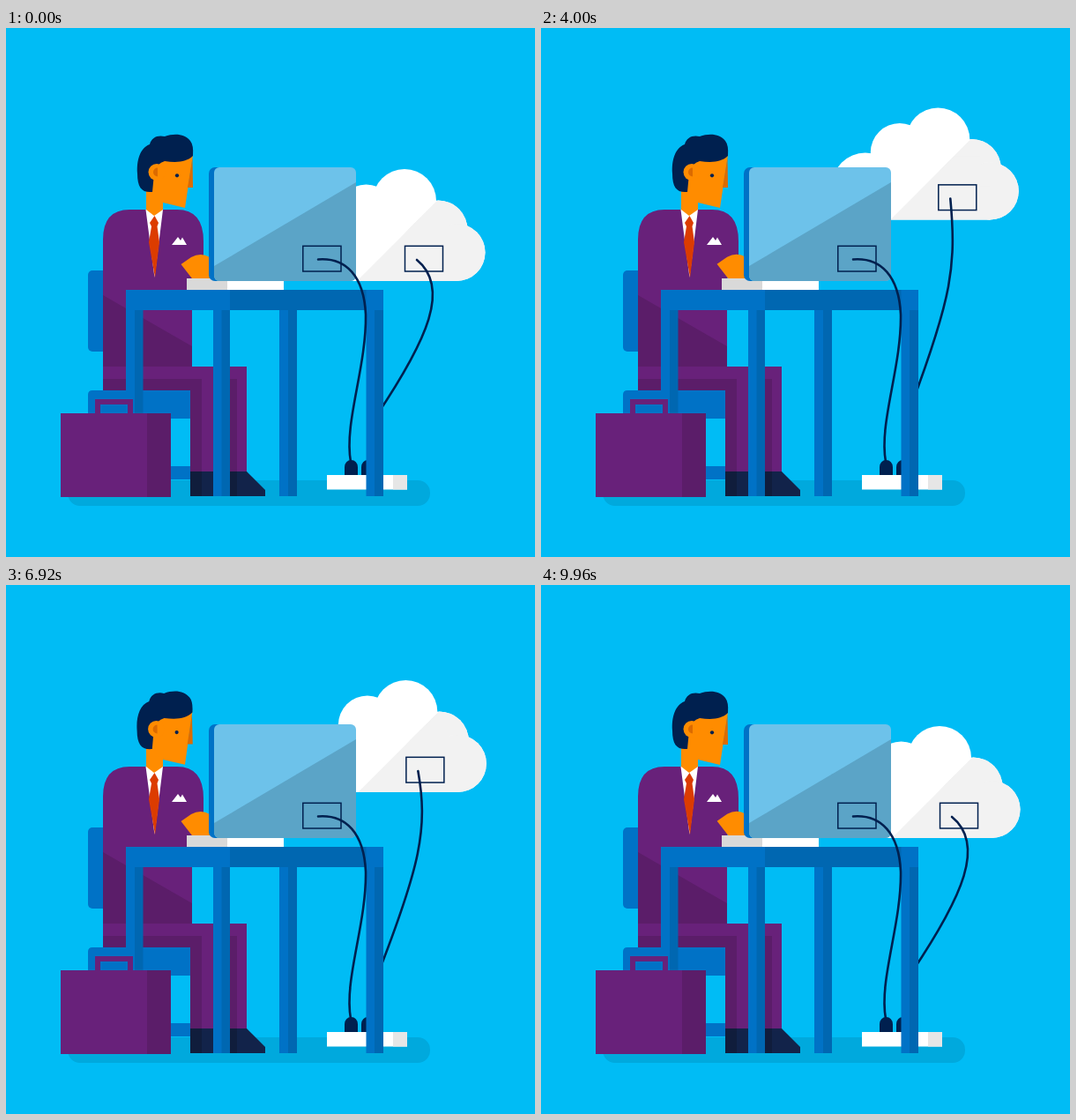
An HTML page for the animation above (10 s loop, 600x600 px).

```html
<!DOCTYPE html>
<html lang="en">
<head>
<meta charset="utf-8">
<title>Cloud desk</title>
<style>
html, body { margin: 0; width: 100%; height: 100%; overflow: hidden; background: #00bcf5; }
svg { display: block; width: 100vw; height: 100vh; }
.sky { fill: #00bcf5; }
.blue { fill: #0072c6; }
.deep { fill: #0067b1; }
.suit { fill: #68217a; }
.shade { fill: #5b1d69; }
.skin { fill: #ff8c00; }
.tan { fill: #dc6b00; }
.navy { fill: #00204f; }
.white { fill: #fff; }
.line { fill: none; stroke: #00204f; stroke-width: 1.5; }
.cable { fill: none; stroke: #00204f; stroke-width: 2.6; stroke-linecap: round; }
</style>
</head>
<body>
<svg viewBox="0 0 600 600">
  <defs>
    <clipPath id="screen"><rect x="236" y="158" width="161" height="129" rx="6"/></clipPath>
    <clipPath id="right"><path d="M585 100V300H385Z"/></clipPath>
    <g id="puffs">
      <circle cx="369.5" cy="249" r="38"/>
      <circle cx="408.5" cy="210.5" r="33"/>
      <circle cx="452" cy="196" r="36"/>
      <circle cx="490" cy="229" r="33.5"/>
      <circle cx="511" cy="254.5" r="32.5"/>
      <path d="M369 249H400V215H500V249H511V287H369Z"/>
    </g>
  </defs>

  <rect class="sky" width="600" height="600"/>
  <rect x="70" y="513" width="411" height="29" rx="14" fill="#00a9dd"/>

  <g id="cloud">
    <use href="#puffs" class="white"/>
    <g clip-path="url(#right)"><use href="#puffs" fill="#f2f2f2"/></g>
    <rect class="line" x="452.5" y="247.3" width="43" height="28.7"/>
  </g>
  <path id="cable" class="cable"/>

  <g class="navy">
    <path d="M384 508V498a7.5 8 0 0 1 15 0V508Z"/>
    <path d="M403 508V498a7.5 8 0 0 1 15 0V508Z"/>
  </g>
  <rect class="white" x="364" y="507" width="91" height="16.5"/>
  <rect x="439" y="507" width="16" height="16.5" fill="#e6e6e6"/>

  <g class="blue">
    <rect x="93" y="275" width="30" height="92" rx="5"/>
    <path d="M93 443V416q0-5 5-5H210V443Z"/>
    <rect x="180" y="497" width="30" height="15"/>
  </g>

  <path class="suit" d="M110 411V240Q110 206 140 206H194Q224 206 224 242V258L211 284V384H273V504H209V411Z"/>
  <path class="shade" d="M110 303L211 361V384H110ZM110 398H222V504H209V411H110ZM254 398H262V504H254Z"/>
  <path d="M209 503H235V531H209ZM254 503H273L294 524V531H254Z" fill="#12234a"/>
  <path d="M209 503H222V531H209ZM254 503H262V531H254Z" fill="#101d3c"/>
  <path class="white" d="M158.500 206H178L168.500 283ZM188 246L195 237 198 241 200 237.500 205 246Z"/>
  <path d="M168.500 213L173 221 171.500 225 174 243 169 283 162 243 165 225 163 221Z" fill="#dc3c00"/>
  <path class="skin" d="M159 180H178V206L168 213 159 206Z"/>

  <g id="head">
    <path class="skin" d="M165 152L212 144 203 204 178 198 164 187Z"/>
    <path class="tan" d="M211.500 147L206 181H212Z"/>
    <path class="navy" d="M166 186C154 187 149 181 149 165C148 150 152 136 163 132C165 124 172 121 180 123C191 119 203 120 209 128Q213 133 212 145C205 152 194 153 180 151Q171 153 168 165Z"/>
    <circle class="skin" cx="171" cy="163.500" r="9.500"/>
    <path class="tan" d="M172 158.500a5 5 0 0 0 0 10Z"/>
    <circle class="navy" cx="194" cy="167.300" r="2.100"/>
  </g>

  <path id="hand" class="skin" d="M198.500 268L210 260Q221 254 231 260H238V282L222 288H214Z"/>

  <rect class="white" x="205" y="284" width="110" height="13"/>
  <rect x="205" y="284" width="46" height="13" fill="#d9d9d9"/>

  <g class="blue">
    <rect x="136" y="297" width="292" height="23"/>
    <rect x="136" y="320" width="10" height="130"/>
    <rect x="235" y="320" width="10" height="211"/>
    <rect x="310" y="320" width="10" height="211"/>
    <rect x="408.500" y="320" width="10" height="211"/>
  </g>
  <g class="deep">
    <rect x="254" y="297" width="154.500" height="23"/>
    <rect x="146" y="320" width="9.500" height="117"/>
    <rect x="244.500" y="320" width="9.500" height="211"/>
    <rect x="320" y="320" width="10" height="211"/>
    <rect x="418" y="320" width="10" height="211"/>
  </g>

  <rect class="blue" x="230" y="158" width="60" height="129" rx="7"/>
  <g clip-path="url(#screen)">
    <rect x="236" y="158" width="161" height="129" fill="#6dc2ea"/>
    <path d="M236 270L397 175V287H236Z" fill="#5ba4c7"/>
  </g>
  <rect class="line" x="336.800" y="247.300" width="43.200" height="28.700"/>
  <path class="cable" d="M354 262.500C386 260 406 282 408 325C409 385 383 448 391 492"/>

  <path d="M104 440V424H141V440" fill="none" stroke="#68217a" stroke-width="6"/>
  <rect class="suit" x="62" y="437" width="125" height="95"/>
  <rect class="shade" x="160" y="437" width="27" height="95"/>
</svg>
<script>
const LOOP = 10;
const byId = id => document.getElementById(id);
const smooth = s => { s = Math.min(1, Math.max(0, s)); return s * s * (3 - 2 * s); };

// Cloud sway: [seconds, x]
const sway = [[0, 0], [1.6, -2.8], [2.6, 1.6], [4, -1.7], [5.5, 1.3], [8.12, 0.9]];
// Cable: [seconds, first control offset x, y, second control x, y, end y]
const bends = [
  [0, 38, 31, 479, 352, 440],
  [1.6, 21, 53, 475, 332, 445],
  [2.6, 19, 66, 467, 320, 450],
  [4, 7, 76, 466, 305, 428],
  [5.72, 4, 74, 466, 305, 443],
  [8.12, 22, 53, 475, 335, 447],
  [9.2, 34, 37, 479, 350, 448]
];

// Smooth periodic curve through keyed values
function sample(keys, t) {
  const n = keys.length;
  const key = i => {
    const turn = Math.floor(i / n), [time, ...values] = keys[i - turn * n];
    return { time: time + turn * LOOP, values };
  };
  let i = n - 1;
  while (keys[i][0] > t) i--;
  const [a, b, c, d] = [i - 1, i, i + 1, i + 2].map(key);
  const span = c.time - b.time, s = (t - b.time) / span;
  return b.values.map((v, k) => {
    const w = c.values[k];
    const m0 = (w - a.values[k]) / (c.time - a.time) * span;
    const m1 = (d.values[k] - v) / (d.time - b.time) * span;
    return v + (w - v) * smooth(s) + m0 * s * (1 - s) ** 2 - m1 * s * s * (1 - s);
  });
}

function draw(t) {
  const [x] = sample(sway, t);
  const y = -82 / 1.06 * smooth(1 - Math.abs(t - 5) / 5) * 1.06 * 0.945;
  byId("cloud").setAttribute("transform", `translate(${x} ${y})`);

  const [dx, dy, cx, cy, end] = sample(bends, t);
  const px = 466 + x, py = 263 + y;
  byId("cable").setAttribute("d", `M${px} ${py}C${px + dx} ${py + dy} ${cx} ${cy} 420 ${end}`);

  const nod = -4.5 * smooth(1 - Math.abs(t - 6.3) / 0.8);
  byId("head").setAttribute("transform", `rotate(${nod} 168 205)`);

  const tap = 1.65 * (1 - Math.cos(2 * Math.PI * 52 * t / LOOP));
  byId("hand").setAttribute("transform", `translate(${tap} ${-tap * 0.3})`);
}

const start = performance.now();
function tick() {
  draw((performance.now() - start) / 1000 % LOOP);
  requestAnimationFrame(tick);
}
tick();
</script>
</body>
</html>
```
